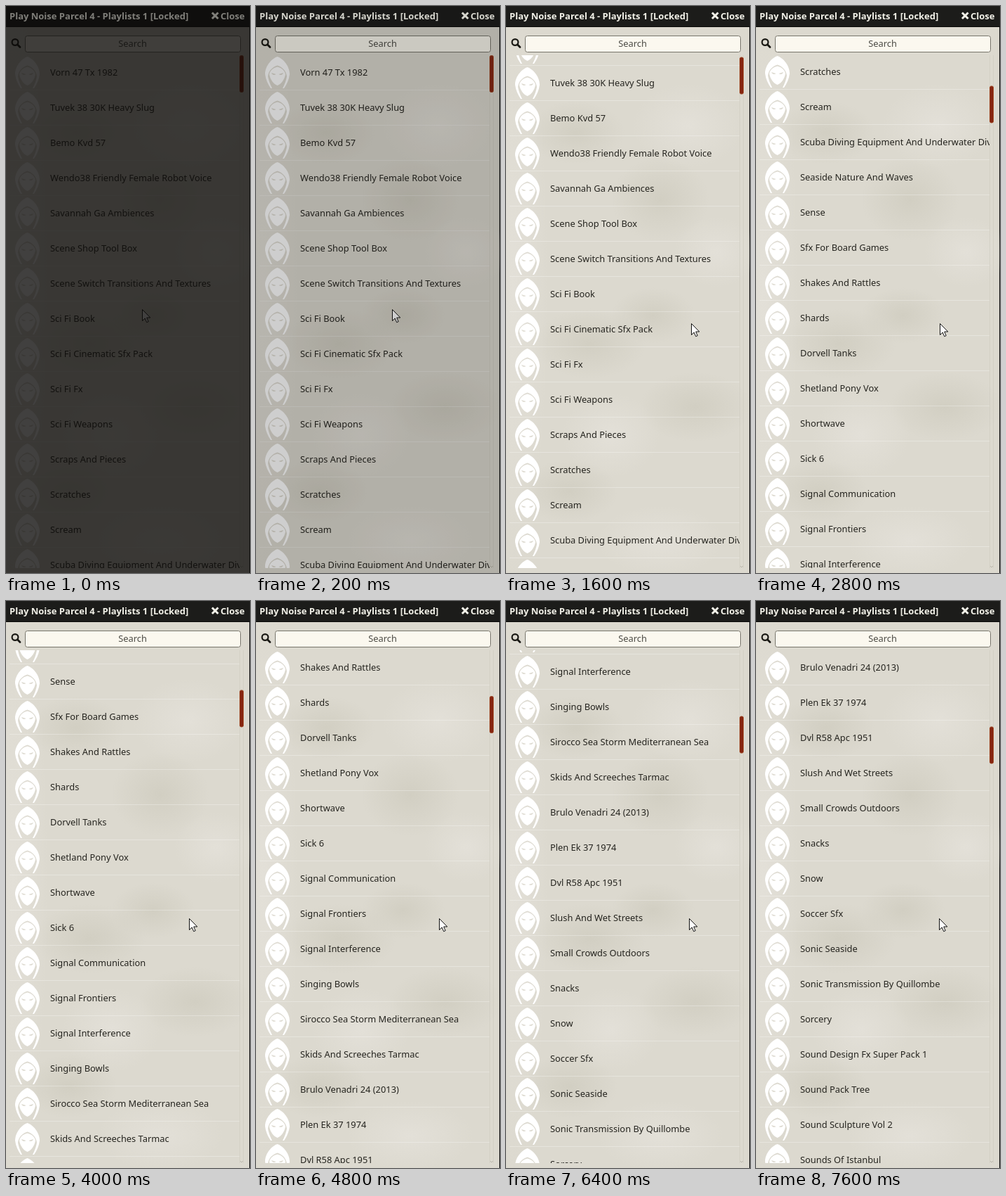
These frames come from a looping animation (348x806 px, 8000 ms). An HTML page:

```html
<!DOCTYPE html>
<html lang="en">
<head>
<meta charset="utf-8">
<title>Playlist browser</title>
<style>
  html, body { margin: 0; width: 100%; height: 100%; overflow: hidden; background: #111; }
  svg { display: block; font: 12.85px "Noto Sans", "Open Sans", sans-serif; fill: #25241f; }
  .title { font-weight: 600; font-size: 13px; fill: #f2f1e8; }
</style>
</head>
<body>
<svg width="348" height="806" viewBox="0 0 348 806">
  <defs>
    <clipPath id="listArea"><rect y="70" width="333" height="729"/></clipPath>
    <radialGradient id="dark"><stop stop-color="#c9c6b8" stop-opacity=".55"/><stop offset="1" stop-color="#c9c6b8" stop-opacity="0"/></radialGradient>
    <radialGradient id="light"><stop stop-color="#e6e3dc" stop-opacity=".7"/><stop offset="1" stop-color="#e6e3dc" stop-opacity="0"/></radialGradient>
    <path id="cowl" fill="#fff" fill-rule="evenodd" d="M30.5 72C37 74 48 84 48 97C47 105 44 111 40 117H38C41 111 43 106 44 100C43 92 38 87 30.5 84.5C23 87 18 92 17 100C18 106 20 111 23 117H21C17 111 14 105 13 97C13 84 24 74 30.5 72Z
      M30.5 86.5C37 88 41 92 42 97C41 104 36 111 30.5 113C25 111 20 104 19 97C20 92 24 88 30.5 86.5Z
      M22 95L28.5 97C26 99 23 98 22 95ZM39 95L32.500 97C35 99 38 98 39 95Z"/>
  </defs>

  <rect width="347" height="806" fill="#dcd9cf"/>
  <g id="paper"></g>

  <path d="M333.500 70V799M338.500 70V799" stroke="#cfccc1" stroke-width=".7"/>
  <path d="M334 796l2 2 2-2" fill="none" stroke="#b9b6aa"/>
  <g clip-path="url(#listArea)"><g id="list"></g></g>
  <rect id="thumb" x="333.500" y="70.500" width="5" height="52" rx="2" fill="#852511" stroke="#9c421f"/>

  <circle cx="13" cy="51.500" r="4.400" fill="none" stroke="#191813" stroke-width="2.200"/>
  <path d="M16.300 54.800L20 58.500" stroke="#191813" stroke-width="2.800" stroke-linecap="round"/>
  <rect x="27.500" y="42.500" width="307" height="23" rx="3" fill="#fbf8ef" stroke="#77756c"/>
  <text x="180.500" y="58" text-anchor="middle" fill="#4b4a44">Search</text>

  <path id="cursor" d="M.5 .5V16.500L4.200 13L6.700 18.700L9.200 17.600L6.700 12H11.800Z" fill="#fff" stroke="#111"/>

  <rect width="348" height="30" fill="#1c1c1a"/>
  <rect y="29" width="348" height="1" fill="#090908"/>
  <rect id="shade" width="348" height="806" fill="#0c0b0a"/>
  <g id="header" class="title">
    <text x="5" y="19">Play Noise Parcel 4 - Playlists 1 [Locked]</text>
    <path d="M295 10.500l6.500 6.500m0-6.500l-6.500 6.500" stroke="#f2f1e8" stroke-width="3" stroke-linecap="square"/>
    <text x="306" y="19">Close</text>
  </g>
</svg>
<script>
const $ = id => document.getElementById(id);

const names = `Vorn 47 Tx 1982|Tuvek 38 30K Heavy Slug|Bemo Kvd 57|Wendo38 Friendly Female Robot Voice
Savannah Ga Ambiences|Scene Shop Tool Box|Scene Switch Transitions And Textures|Sci Fi Book
Sci Fi Cinematic Sfx Pack|Sci Fi Fx|Sci Fi Weapons|Scraps And Pieces|Scratches|Scream
Scuba Diving Equipment And Underwater Diving|Seaside Nature And Waves|Sense|Sfx For Board Games
Shakes And Rattles|Shards|Dorvell Tanks|Shetland Pony Vox|Shortwave|Sick 6|Signal Communication
Signal Frontiers|Signal Interference|Singing Bowls|Sirocco Sea Storm Mediterranean Sea
Skids And Screeches Tarmac|Brulo Venadri 24 (2013)|Plen Ek 37 1974|Dvl R58 Apc 1951
Slush And Wet Streets|Small Crowds Outdoors|Snacks|Snow|Soccer Sfx|Sonic Seaside
Sonic Transmission By Quillombe|Sorcery|Sound Design Fx Super Pack 1|Sound Pack Tree
Sound Sculpture Vol 2|Sounds Of Istanbul`.split(/[|\n]/);

$('list').innerHTML = names.map((name, i) => `<g transform="translate(0 ${i * 50})">
  <use href="#cowl"/><text x="63" y="99">${name}</text>
  <path d="M5 119.500H333" stroke="#fff" stroke-opacity=".28"/></g>`).join('');

// Soft stains on the paper: tone, centre, radii
$('paper').innerHTML = [
  ['dark', 100, 180, 70, 45], ['dark', 220, 275, 70, 60], ['dark', 120, 480, 80, 50],
  ['dark', 270, 570, 80, 50], ['dark', 90, 690, 70, 45], ['dark', 210, 440, 60, 40],
  ['light', 260, 170, 80, 60], ['light', 150, 610, 70, 60], ['light', 10, 400, 50, 420],
  ['light', 300, 350, 60, 50], ['light', 220, 760, 90, 50]
].map(([tone, x, y, rx, ry]) =>
  `<ellipse cx="${x}" cy="${y}" rx="${rx}" ry="${ry}" fill="url(#${tone})"/>`).join('');

// Tracks of [time, value]
const scroll = [[1400, 0], [1600, 35], [2600, 535], [2800, 601], [4800, 900], [5000, 900], [5600, 1200],
  [6200, 1200], [6400, 1294], [6600, 1300], [7000, 1300], [7400, 1470], [7600, 1500]];
const cursorX = [[800, 194], [1400, 264], [2000, 264], [2800, 262], [4000, 261]];
const cursorY = [[800, 431], [1400, 451]];
const shade = [[0, .78], [200, .2], [400, .01], [600, 0]];

function valueAt(track, t) {
  const next = track.findIndex(([time]) => time > t);
  if (next < 0) return track[track.length - 1][1];
  if (next === 0) return track[0][1];
  const [t0, a] = track[next - 1], [t1, b] = track[next];
  return a + (b - a) * (t - t0) / (t1 - t0);
}

const LOOP = 8000, STEP = 200;
const start = performance.now();

function draw(now) {
  const elapsed = Math.max(0, now - start) % LOOP;
  const t = Math.floor(elapsed / STEP) * STEP;
  const y = Math.round(valueAt(scroll, t));
  const dim = valueAt(shade, t);
  $('list').setAttribute('transform', `translate(0 ${-y})`);
  $('thumb').setAttribute('y', 70.5 + y * .0723);
  $('cursor').setAttribute('transform',
    `translate(${Math.round(valueAt(cursorX, t))} ${Math.round(valueAt(cursorY, t))})`);
  $('shade').setAttribute('opacity', dim);
  $('header').setAttribute('opacity', 1 - dim * .65);
  requestAnimationFrame(draw);
}
draw(start);
</script>
</body>
</html>
```
